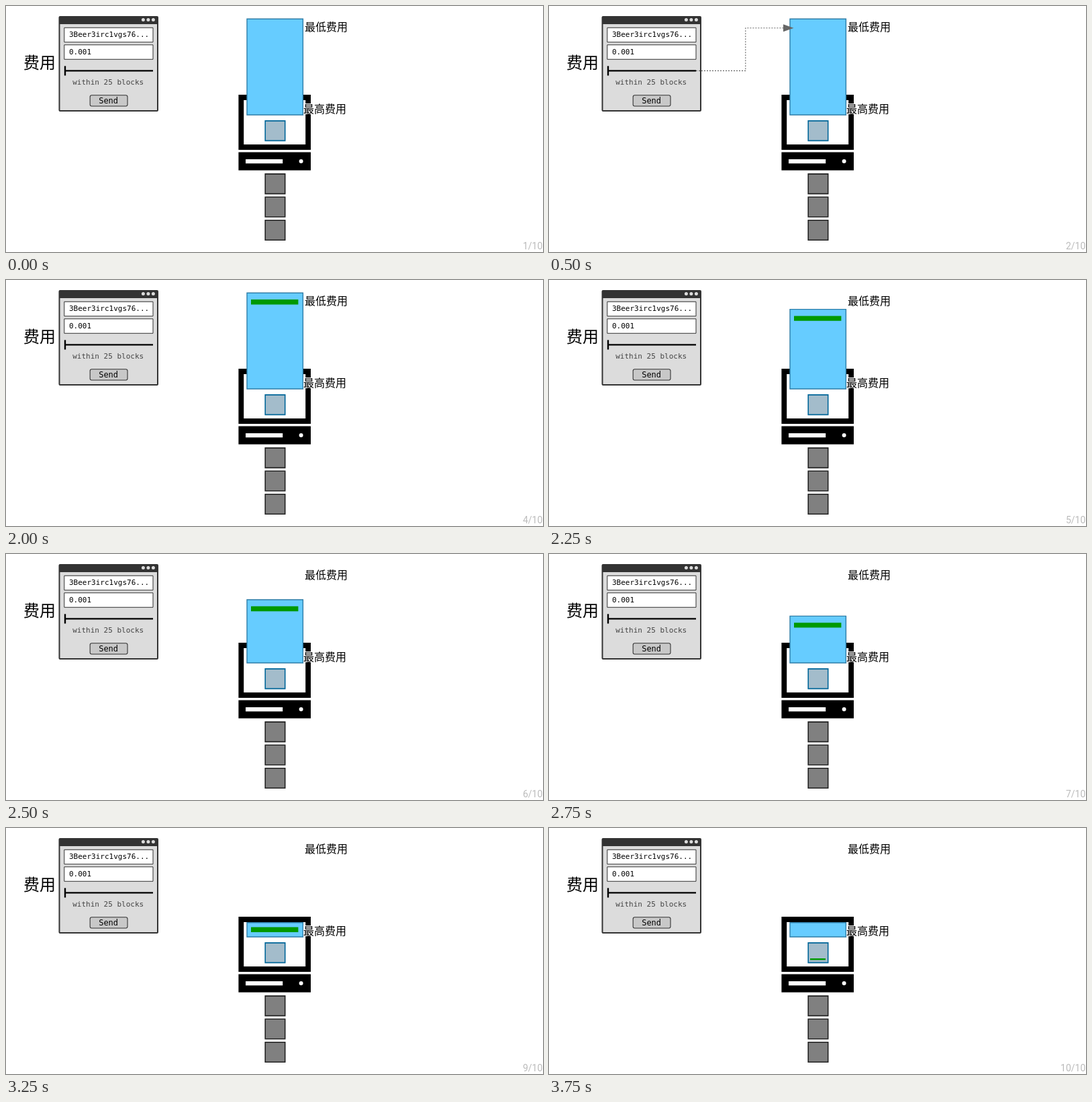
Write an HTML page with a canvas that moves like this. It is 800 px wide and 366 px high and loops after 4750 ms.

```html
<!DOCTYPE html>
<html lang="zh-CN">
<head>
<meta charset="utf-8">
<title>费用</title>
<style>
html, body { margin: 0; width: 100%; height: 100%; overflow: hidden; background: #fff; }
canvas { display: block; }
</style>
</head>
<body>
<canvas id="stage" width="800" height="366"></canvas>
<script>
const ctx = document.getElementById('stage').getContext('2d');
const MONO = '"DejaVu Sans Mono", monospace';
const CJK = '"Noto Sans CJK SC", "Noto Sans CJK", sans-serif';
const STARTS = [0, 500, 1000, 2000, 2250, 2500, 2750, 3000, 3250, 3750];
const LOOP = 4750;
const GREEN = '#009900';

function box(x, y, w, h, fill, stroke, line = 1, radius = 0) {
  ctx.beginPath();
  ctx.roundRect(x, y, w, h, radius);
  if (fill) { ctx.fillStyle = fill; ctx.fill(); }
  if (stroke) { ctx.strokeStyle = stroke; ctx.lineWidth = line; ctx.stroke(); }
}

function dot(x, y, r, fill) {
  ctx.beginPath();
  ctx.arc(x, y, r, 0, Math.PI * 2);
  ctx.fillStyle = fill;
  ctx.fill();
}

function path(points, stroke, line, dash = []) {
  ctx.beginPath();
  points.forEach(([x, y]) => ctx.lineTo(x, y));
  ctx.strokeStyle = stroke;
  ctx.lineWidth = line;
  ctx.setLineDash(dash);
  ctx.stroke();
  ctx.setLineDash([]);
}

function text(str, x, y, size, family, fill = '#000', align = 'left') {
  ctx.font = `${size}px ${family}`;
  ctx.textAlign = align;
  ctx.fillStyle = fill;
  ctx.fillText(str, x, y);
}

function drawWallet() {
  box(79.5, 16, 146.5, 140, '#dcdcdc', '#333', 2, 1);
  box(79.5, 16, 146.5, 11, '#333');
  [204.4, 211.9, 219.4].forEach(x => dot(x, 20.6, 2.5, '#dcdcdc'));
  box(86.8, 32.3, 132.2, 21.5, '#fff', '#333');
  box(86.8, 57.8, 132.2, 21.5, '#fff', '#333');
  text('3Beer3irc1vgs76...', 94, 46, 11, MONO);
  text('0.001', 94, 72, 11, MONO);
  path([[88, 96.4], [219, 96.4]], '#000', 2.4);
  path([[88, 89.3], [88, 103.5]], '#000', 2.4);
  text('within 25 blocks', 152.2, 117, 11, MONO, '#444', 'center');
  box(125.2, 132.7, 55.8, 16.3, '#c8c8c8', '#333', 1.1, 2.5);
  text('Send', 152.6, 145, 12, MONO, '#000', 'center');
  text('费用', 26, 93, 24, CJK);
}

function drawNode() {
  box(350.3, 136, 99.8, 74, '#fff', '#000', 7.8);
  box(346.4, 217.5, 107.6, 27, '#000');
  box(357, 228, 55.2, 6.2, '#fff');
  dot(439.6, 231, 3, '#fff');
  box(386.2, 170.9, 29.5, 29.5, '#a3bccb', '#006699', 1.6);
  for (let i = 0; i < 3; i++) {
    box(386.2, 249.9 + i * 34.4, 29.5, 29.5, '#808080', '#222', 1.6);
  }
}

function drawArrow() {
  path([[219, 96.4], [292.8, 96.4], [292.8, 32.8], [350, 32.8]], '#666', 1.1, [2, 2]);
  ctx.beginPath();
  ctx.moveTo(364.5, 32.8);
  ctx.lineTo(349, 27.3);
  ctx.lineTo(349, 38.3);
  ctx.fillStyle = '#666';
  ctx.fill();
}

function draw(step) {
  // The queue shrinks one notch per step until it fits the screen.
  const notch = Math.min(Math.max(step - 3, 0), 5);
  const top = 19.2 + 24.4 * notch - (notch === 5 ? 0.5 : 0);
  ctx.fillStyle = '#fff';
  ctx.fillRect(0, 0, 800, 366);

  drawWallet();
  drawNode();
  box(359, top, 83.4, 162 - top, '#66ccff', '#2e7ea8', 1.4);
  if (step === 1 || step === 2) drawArrow();
  if (step >= 2 && step <= 8) {
    box(365, notch === 5 ? 147.6 : top + 9.8, 70.4, 7.4, GREEN);
  }
  if (step === 9) box(389, 194, 23, 2.4, GREEN);

  box(443.3, 145, 64, 16, '#fff');
  text('最低费用', 445, 37, 16, CJK);
  text('最高费用', 443, 159, 16, CJK);
  text(`${step + 1}/10`, 799.3, 362, 14, 'Roboto, sans-serif', '#bbb', 'right');
}

const origin = performance.now();

function tick() {
  const t = (performance.now() - origin) % LOOP;
  draw(STARTS.findLastIndex(s => t >= s));
  requestAnimationFrame(tick);
}
tick();
</script>
</body>
</html>
```
